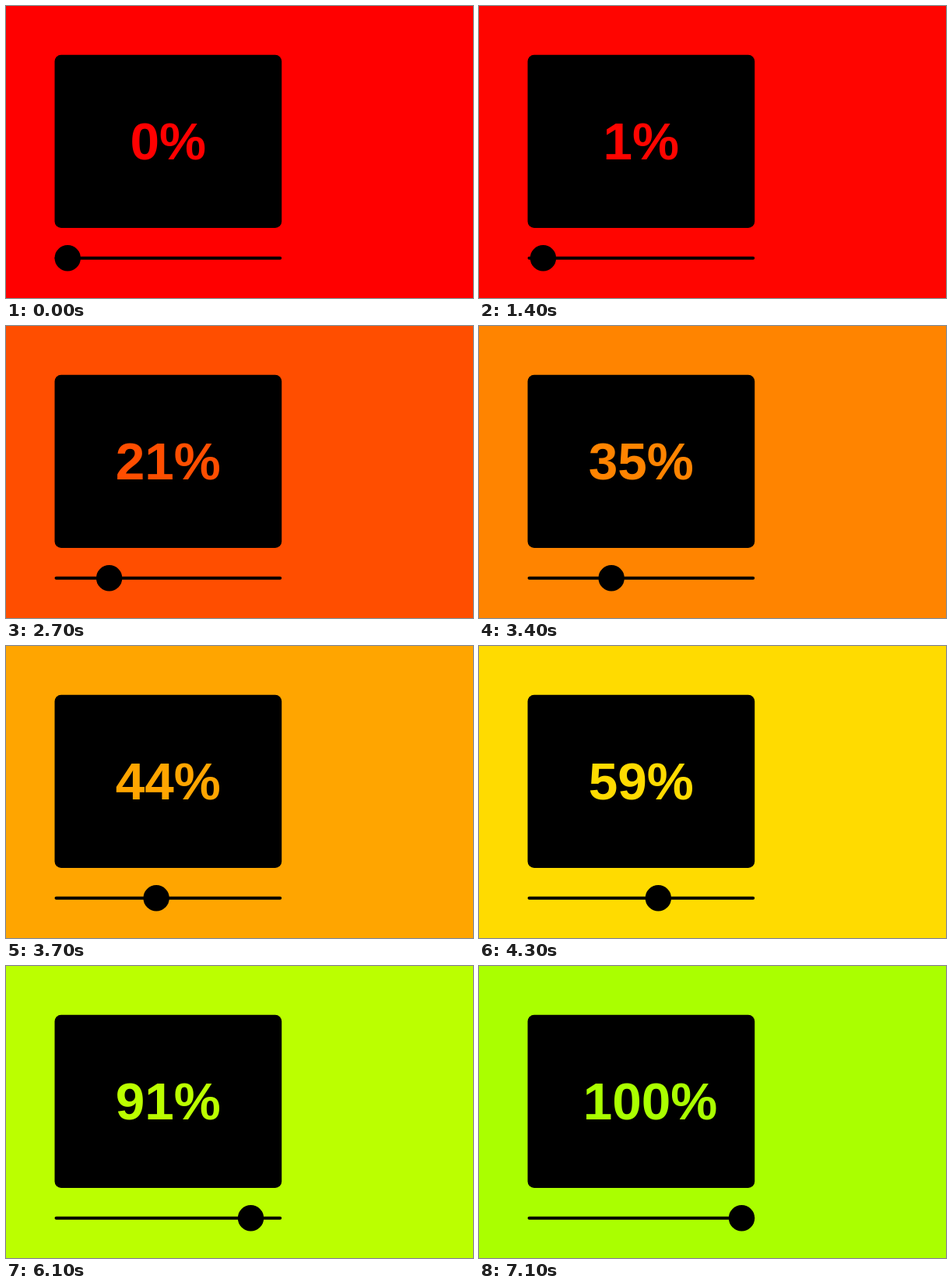
These frames come from a looping animation (600x375 px, 8000 ms). An HTML page:

```html
<!DOCTYPE html>
<html lang="en">
<head>
<meta charset="utf-8">
<title>Slider</title>
<style>
  html, body { margin: 0; width: 100%; height: 100%; overflow: hidden; }
  svg { display: block; width: 100vw; height: 100vh; background: var(--tint, #f00); }
  text { font: bold 67.5px "Liberation Sans", Arial, sans-serif; fill: var(--tint, #f00); }
</style>
</head>
<body>
<svg viewBox="0 0 600 375">
  <rect x="62.5" y="62.7" width="291.7" height="222.3" rx="8.3"/>
  <rect x="62.5" y="321.7" width="291.7" height="4.1" rx="2.05"/>
  <circle id="knob" cx="79.2" cy="323.75" r="16.7"/>
  <text id="label" x="208.3" y="197" text-anchor="middle">0%</text>
</svg>
<script>
  const LOOP = 8000, STEP = 100;
  const knob = document.getElementById('knob');
  const label = document.getElementById('label');

  // Drag progress: [ms, fraction]
  const drag = [[1300, 0], [2000, .089], [3400, .352], [3700, .441],
                [4900, .71], [6100, .911], [7100, 1]];
  const rests = [2300, 5000];

  const slope = i => (drag[i + 1][1] - drag[i][1]) / (drag[i + 1][0] - drag[i][0]);

  // Harmonic mean keeps the curve monotone.
  function tangent(i) {
    if (i === 0) return slope(0);
    if (i === drag.length - 1) return slope(i - 1);
    const a = slope(i - 1), b = slope(i);
    return 2 * a * b / (a + b);
  }

  function progress(t) {
    if (t <= drag[0][0]) return 0;
    const i = drag.findIndex(d => d[0] >= t) - 1;
    if (i < 0) return 1;
    const [t0, p0] = drag[i], [t1, p1] = drag[i + 1];
    const h = t1 - t0, u = (t - t0) / h, v = 1 - u;
    return v * v * (1 + 2 * u) * p0 + u * v * v * h * tangent(i)
         + u * u * (3 - 2 * u) * p1 - u * u * v * h * tangent(i + 1);
  }

  function tint(p) {
    const green = Math.min(255, 375 * p);
    const past = Math.max(0, (p - .68) / .32);
    const red = 255 - 85 * past ** .7;
    return `rgb(${Math.round(red)},${Math.round(green)},0)`;
  }

  function draw(now) {
    let t = Math.floor(now % LOOP / STEP) * STEP;
    if (rests.includes(t)) t -= STEP;
    const p = progress(t), percent = Math.round(p * 100);
    document.documentElement.style.setProperty('--tint', tint(p));
    knob.setAttribute('cx', 79.2 + 258.3 * p);
    label.textContent = percent + '%';
    // Three digits overflow the label box to the right.
    label.setAttribute('x', percent === 100 ? 220 : 208.3);
  }

  let start;
  function tick(now) {
    start ??= now;
    draw(now - start);
    requestAnimationFrame(tick);
  }
  draw(0);
  requestAnimationFrame(tick);
</script>
</body>
</html>
```
